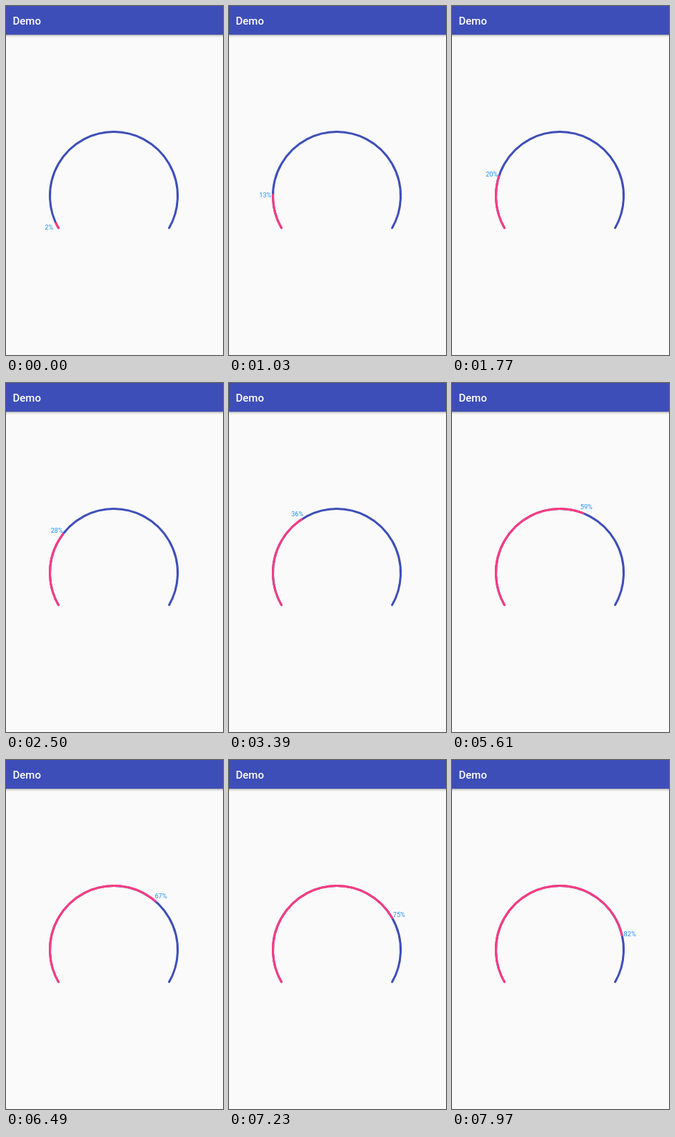
Recreate the animation shown at these times as an HTML page. Size 304 by 487 pixels, loop 8 s.

```html
<!DOCTYPE html>
<html lang="en">
<head>
<meta charset="utf-8">
<title>Demo</title>
<style>
  html, body { margin: 0; width: 100%; height: 100%; overflow: hidden; background: #fafafa; }
  svg { display: block; width: 100%; height: 100%; }
  text { font-family: Roboto, sans-serif; }
  .title { font-size: 15px; font-weight: 500; fill: #fff; }
  .label { font-size: 9.2px; fill: #1e90ff; text-anchor: middle; }
  .arc { fill: none; stroke-width: 3; stroke-linecap: round; }
</style>
</head>
<body>
<svg viewBox="0 0 304 487">
  <defs>
    <linearGradient id="shadow" x2="0" y2="1">
      <stop offset="0" stop-color="#000" stop-opacity=".32"/>
      <stop offset=".5" stop-color="#000" stop-opacity=".09"/>
      <stop offset="1" stop-color="#000" stop-opacity="0"/>
    </linearGradient>
  </defs>
  <rect width="304" height="487" fill="#fafafa"/>
  <rect y="40" width="304" height="4" fill="url(#shadow)"/>
  <rect width="304" height="40" fill="#3e4eb8"/>
  <text class="title" x="9.5" y="25.5">Demo</text>
  <path class="arc" id="track" stroke="#3e4eb8"/>
  <path class="arc" id="progress" stroke="#ff3b80" pathLength="100"/>
  <text class="label" id="label"></text>
</svg>
<script>
  const LOOP = 8000, STEP = 147.6;
  const CENTER = { x: 151, y: 265 }, RADIUS = 89.5, LABEL_RADIUS = 100.5;
  const START = 150, SWEEP = 240;
  const [track, progress, label] =
    ['track', 'progress', 'label'].map(id => document.getElementById(id));

  function pointAt(percent, radius) {
    const angle = (START + SWEEP * percent / 100) * Math.PI / 180;
    return { x: CENTER.x + radius * Math.cos(angle), y: CENTER.y + radius * Math.sin(angle) };
  }

  const from = pointAt(0, RADIUS), to = pointAt(100, RADIUS);
  const arc = `M${from.x} ${from.y}A${RADIUS} ${RADIUS} 0 1 1 ${to.x} ${to.y}`;
  track.setAttribute('d', arc);
  progress.setAttribute('d', arc);

  // The gauge gains 1% every 100 ms but is only redrawn once per STEP.
  function draw(time) {
    const step = Math.floor((time % LOOP + 9.5) / STEP);
    const percent = Math.floor(2.96 + step * STEP / 100);
    const spot = pointAt(percent, LABEL_RADIUS);
    progress.setAttribute('stroke-dasharray', `${percent} 200`);
    label.setAttribute('x', spot.x + 0.3);
    label.setAttribute('y', spot.y + 4.4);
    label.textContent = percent + '%';
  }

  const begin = performance.now();
  function tick() {
    draw(performance.now() - begin);
    requestAnimationFrame(tick);
  }
  tick();
</script>
</body>
</html>
```
